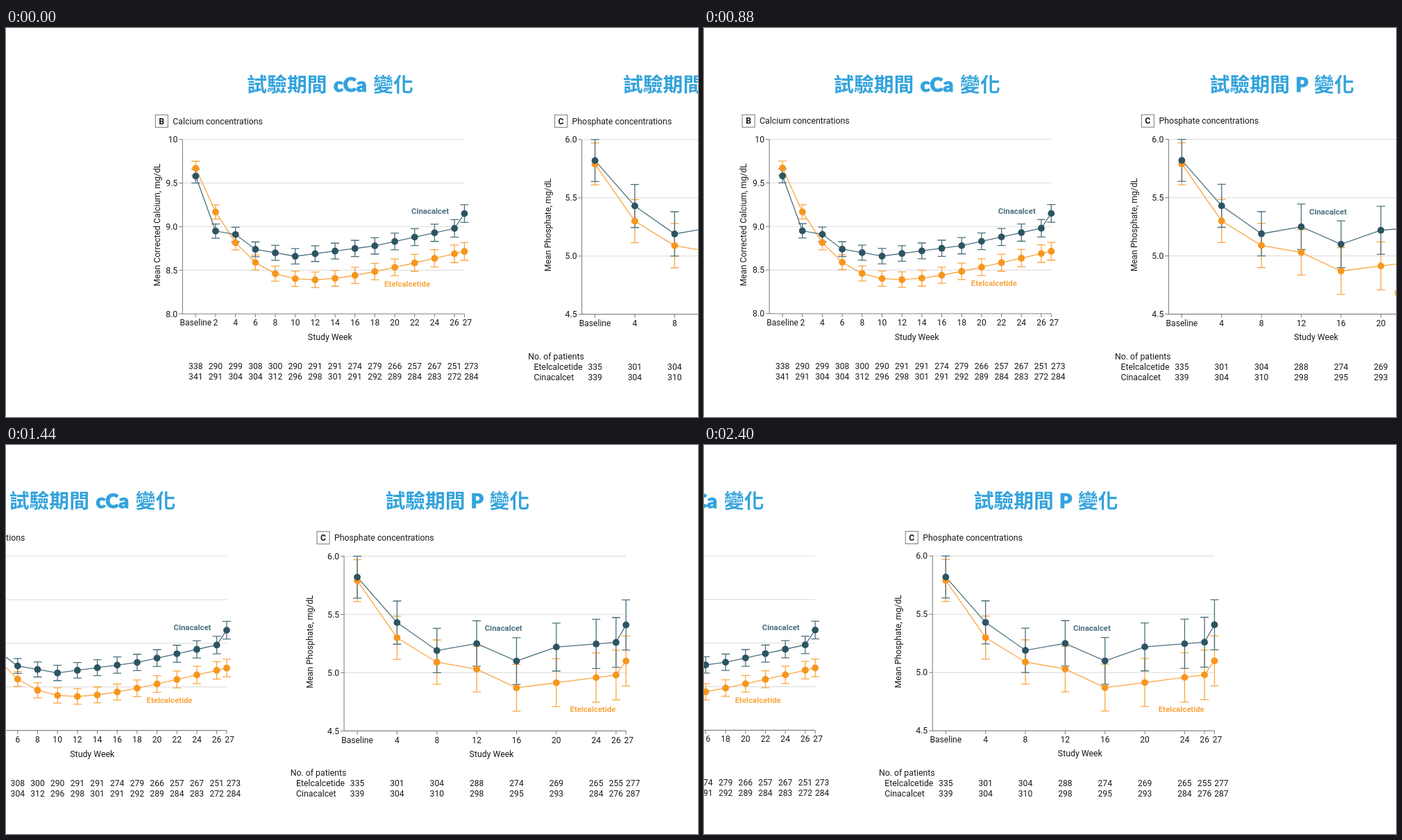
An HTML page for the animation above (2.92 s loop, 997 by 561 pixels).

```html
<!DOCTYPE html>
<html lang="zh-Hant">
<head>
<meta charset="utf-8">
<title>cCa / P</title>
<style>
  html, body { margin: 0; width: 100%; height: 100%; overflow: hidden; background: #fff; }
  svg { display: block; width: 997px; height: 561px; }
  text { font: 12.3px Roboto, "Open Sans", sans-serif; fill: #1c191a; }
  .small { font-size: 12.1px; }
  .mid { text-anchor: middle; }
  .end { text-anchor: end; }
  .bold { font-weight: 700; }
  .title { font: 700 28.8px "Noto Sans CJK TC", "Noto Sans CJK JP", sans-serif; fill: #33a3dc; }
  .latin { font-family: Lato, sans-serif; font-weight: 900; stroke: #33a3dc; stroke-width: .9px; }
  .name { font-size: 11.4px; font-weight: 700; }
  .grid { stroke: #e0e0e0; stroke-width: 1.2; }
  .axis { stroke: #808285; stroke-width: 1.1; fill: none; }
  .line { fill: none; stroke-width: 1.3; }
</style>
</head>
<body>
<svg viewBox="0 0 997 561"><g id="slide"></g></svg>
<script>
const slide = document.getElementById('slide');
const LAST_WEEK = 27;

function add(tag, attrs, content) {
  const el = document.createElementNS('http://www.w3.org/2000/svg', tag);
  for (const key in attrs) el.setAttribute(key, attrs[key]);
  if (content !== undefined) el.textContent = content;
  slide.append(el);
}
const path = (d, cls, stroke) => add('path', stroke ? { d, class: cls, stroke } : { d, class: cls });
const label = (x, y, content, cls = '', extra = {}) => add('text', { x, y, class: cls, ...extra }, content);

// Straight lines through a few {week: value} points
function through(points) {
  const keys = Object.keys(points).map(Number);
  return week => {
    const i = Math.max(1, keys.findIndex(k => k >= week));
    const a = keys[i - 1], b = keys[i];
    return points[a] + (points[b] - points[a]) * (week - a) / (b - a);
  };
}

function title(x, word, wordX, tailX) {
  label(x, 91.8, '試驗期間', 'title');
  label(wordX, 91.8, word, 'title latin');
  label(tailX, 91.8, '變化', 'title');
}

function chart(c) {
  const px = week => c.x + week * 14.34;
  const py = value => c.top + (c.max - value) * c.perUnit;
  const left = c.x - 19, right = px(LAST_WEEK), bottom = py(c.min);
  const weeks = [];
  for (let w = 0; w < 26; w += c.every) weeks.push(w);
  weeks.push(26, LAST_WEEK);

  add('rect', { x: left - 39, y: 125.3, width: 18, height: 18, class: 'axis' });
  label(left - 30, 138.6, c.letter, 'mid bold');
  label(left - 14, 138.6, c.heading);

  for (let v = c.max; v >= c.min; v -= 0.5) {
    if (v > c.min) path(`M${left} ${py(v)}H${right}`, 'grid');
    path(`M${left - 5} ${py(v)}H${left}`, 'axis');
    label(left - 7, py(v) + 4.4, v === 10 ? '10' : v.toFixed(1), 'end');
  }
  path(`M${left} ${c.top}V${bottom}H${right}`, 'axis');
  label(0, 0, c.unit, 'mid', { transform: `translate(${c.unitX} 284) rotate(-90)` });

  const rows = c.patients.map(row => row.split(' '));
  weeks.forEach((week, i) => {
    const x = px(week), last = week === LAST_WEEK;
    path(`M${x} ${bottom}v5`, 'axis');
    label(last ? x + 4 : x, c.tickY, week || 'Baseline', 'mid small');
    rows.forEach((row, r) => label(last ? x + 10 : x, c.rowY + 15 * r, row[i], 'mid small'));
  });
  label(c.x + 193.5, 450.2, 'Study Week', 'mid');

  for (const { value, stroke } of c.series) {
    path('M' + weeks.map(w => `${px(w)} ${py(value(w))}`).join('L'), 'line', stroke);
    for (const w of weeks) {
      const x = px(w), y = py(value(w)), half = c.spread(w) * c.perUnit;
      path(`M${x - 6} ${y - half}h12m-6 0v${2 * half}m-6 0h12`, 'line', stroke);
    }
  }
  for (const { name, at, value, stroke, fill } of c.series) {
    for (const w of weeks) add('circle', { cx: px(w), cy: py(value(w)), r: 4.9, fill });
    label(...at, name, 'name', { style: `fill:${stroke}` });
  }
}

const etelcalcetide = (at, value) =>
  ({ name: 'Etelcalcetide', at, value, stroke: '#f9a640', fill: '#f7961e' });
const cinacalcet = (at, value) =>
  ({ name: 'Cinacalcet', at, value, stroke: '#4b707d', fill: '#2d5463' });

title(347.3, 'cCa', 472, 529.3);
title(889, 'P', 1012.4, 1039.3);

chart({
  letter: 'B', heading: 'Calcium concentrations',
  unit: 'Mean Corrected Calcium, mg/dL', unitX: 221.5,
  x: 273.3, top: 160.8, perUnit: 125.7, max: 10, min: 8,
  every: 2, tickY: 429.3, rowY: 492.2,
  spread: w => 0.08 + 0.0008 * w,
  series: [
    // decay onto a slowly rising line
    etelcalcetide([545, 372.6], w => 8 + 0.0265 * w + 1.67 * Math.exp(-0.19 * w - 0.006 * w * w)),
    cinacalcet([584, 268], through({ 0: 9.58, 2: 8.95, 4: 8.91, 6: 8.74, 10: 8.66, 18: 8.78, 26: 8.98, 27: 9.15 }))
  ],
  patients: [
    '338 290 299 308 300 290 291 291 274 279 266 257 267 251 273',
    '341 291 304 304 312 296 298 301 291 292 289 284 283 272 284'
  ]
});

chart({
  letter: 'C', heading: 'Phosphate concentrations',
  unit: 'Mean Phosphate, mg/dL', unitX: 784.5,
  x: 848.6, top: 160.9, perUnit: 168, max: 6, min: 4.5,
  every: 4, tickY: 430.3, rowY: 492.8,
  spread: w => 0.18 + 0.0013 * w,
  series: [
    etelcalcetide([1155, 386], through({ 0: 5.79, 4: 5.3, 8: 5.09, 12: 5.03, 16: 4.87, 26: 4.98, 27: 5.1 })),
    cinacalcet([1032.2, 268.8], through({ 0: 5.82, 4: 5.43, 8: 5.19, 12: 5.25, 16: 5.1, 20: 5.22, 26: 5.26, 27: 5.41 }))
  ],
  patients: [
    '335 301 304 288 274 269 265 255 277',
    '339 304 310 298 295 293 284 276 287'
  ]
});
label(752.2, 478, 'No. of patients');
label(760.6, 492.8, 'Etelcalcetide');
label(760.6, 507.8, 'Cinacalcet');

// cubic-bezier(0, 0, .58, 1)
function easeOut(u) {
  let lo = 0, hi = 1;
  for (let i = 0; i < 24; i++) {
    const s = (lo + hi) / 2;
    if (3 * s * s * (1 - s) * 0.58 + s ** 3 < u) lo = s; else hi = s;
  }
  return lo * lo * (3 - 2 * lo);
}

const LOOP = 2920, STEP = 40, START = 480, GLIDE = 1920;

function draw() {
  const t = Math.floor((performance.now() % LOOP) / STEP) * STEP;
  const p = easeOut(Math.min(1, Math.max(0, (t - START) / GLIDE)));
  slide.setAttribute('transform', `translate(${-500.3 * p} ${-0.8 * p})`);
  requestAnimationFrame(draw);
}
draw();
</script>
</body>
</html>
```
